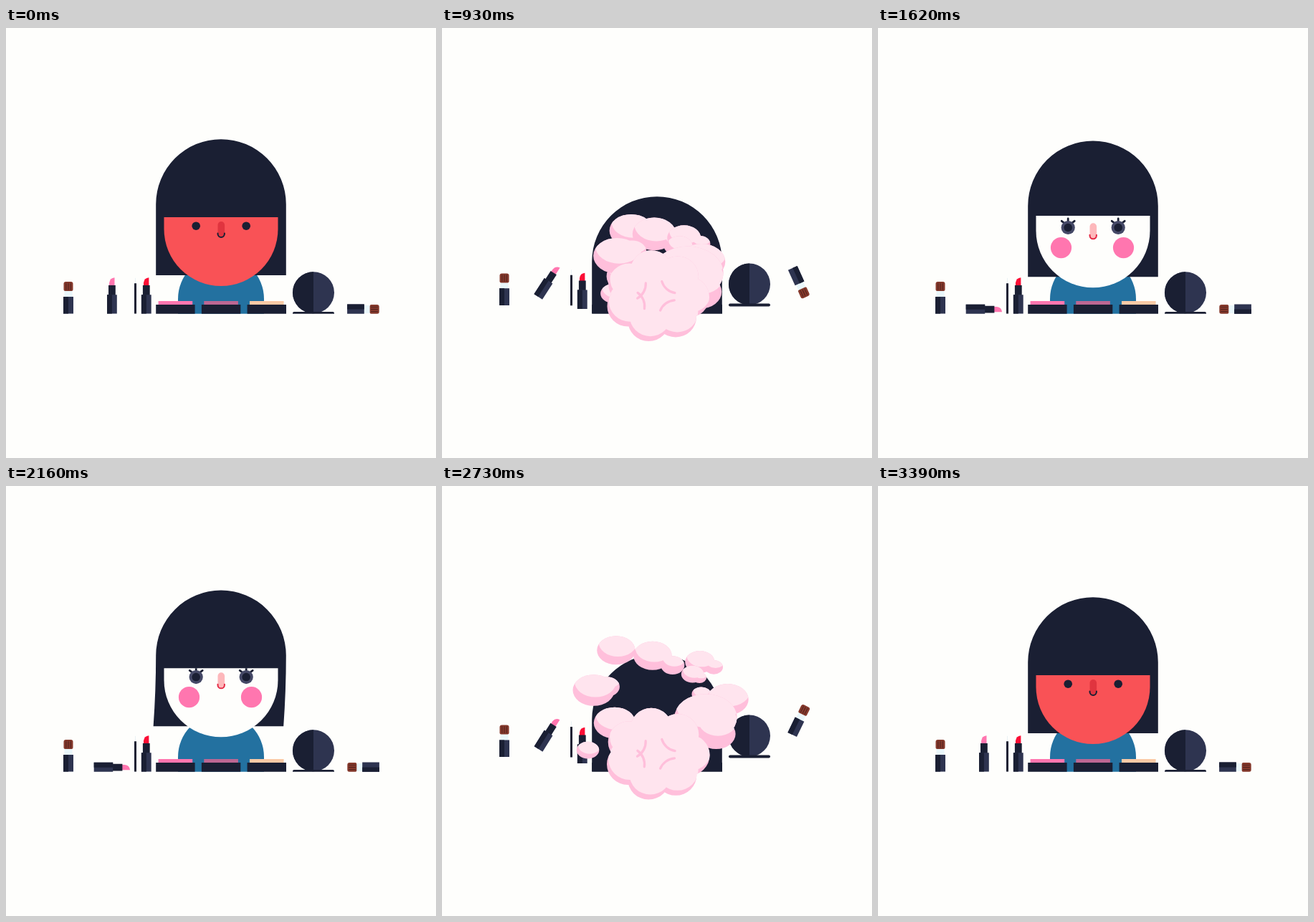
Animation of 600 by 600 pixels, one loop 3.42 s. Source, as an HTML page with a canvas:

```html
<!DOCTYPE html>
<html lang="en">
<head>
<meta charset="utf-8">
<title>Make-up</title>
<style>
html, body { margin: 0; width: 100%; height: 100%; overflow: hidden; background: #fefefc; }
canvas { display: block; width: 600px; height: 600px; }
</style>
</head>
<body>
<canvas id="stage" width="600" height="600"></canvas>
<script>
const ctx = document.getElementById('stage').getContext('2d');
const LOOP = 3420, BEAT = 1740, GROUND = 398.7, TAU = Math.PI * 2;
const PAPER = '#fefefc', DARK = '#1a1f33', SLATE = '#2e3450', PINK = '#ff76af';
const PUFF = '#ffbfdb', PUFF_LIGHT = '#ffe4ee';

// Progress from a to b, with easing
const clamp = x => Math.min(1, Math.max(0, x));
const span = (t, a, b) => clamp((t - a) / (b - a));
const sine = (t, a, b) => (1 - Math.cos(Math.PI * span(t, a, b))) / 2;
const out = (t, a, b) => 1 - (1 - span(t, a, b)) ** 2;
const quartic = (t, a, b) => {
  const x = span(t, a, b);
  return x < .5 ? 8 * x ** 4 : 1 - 8 * (1 - x) ** 4;
};
const mix = (a, b, k) => a + (b - a) * k;

// Drawing helpers
function fill(color) { ctx.fillStyle = color; ctx.fill(); }
function box(x, y, w, h, color, r = 0) {
  ctx.beginPath();
  ctx.roundRect(x, y, w, h, r);
  fill(color);
}
function disc(x, y, r, color, from = 0, to = TAU) {
  ctx.beginPath();
  ctx.arc(x, y, r, from, to);
  fill(color);
}
function stroke(color, width) {
  ctx.strokeStyle = color;
  ctx.lineWidth = width;
  ctx.lineCap = 'round';
  ctx.stroke();
}
function line(x1, y1, x2, y2, color, width) {
  ctx.beginPath();
  ctx.moveTo(x1, y1);
  ctx.lineTo(x2, y2);
  stroke(color, width);
}
function at(x, y, draw, turn = 0, size = 1) {
  ctx.save();
  ctx.translate(x, y);
  ctx.rotate(turn);
  ctx.scale(size, size);
  draw();
  ctx.restore();
}

// Table items
function brush() {
  box(-5.5, -10, 11, 9, '#e9f6fa');
  box(-6.5, -22.2, 13, 13, '#85392c', [3, 3, 2, 2]);
  for (const x of [-3.2, 0, 3.2]) line(x, -20, x, -11, '#4f211d', 1);
  box(-7, -1.3, 14, 23.7, SLATE);
  box(-7, -1.3, 7, 23.7, DARK);
}
function lipstick(color) {
  ctx.beginPath();
  ctx.moveTo(-3.8, -14);
  ctx.lineTo(-3.8, -18);
  ctx.quadraticCurveTo(-3, -24.7, 3.6, -25.2);
  ctx.lineTo(3.6, -14);
  fill(color);
  box(-4.9, -14.5, 9.8, 14, DARK);
  box(-6.9, -1.3, 13.8, 26.5, SLATE);
  box(-6.9, -1.3, 6.9, 26.5, DARK);
}
function liner() {
  box(-.5, -50, 1, 8, '#eaf1f3');
  box(-1.5, -42.5, 3, 42.5, DARK);
}
function compact() {
  disc(0, -29.5, 29, SLATE);
  disc(0, -29.5, 29, DARK, TAU / 4, TAU * .75);
  line(-27, -.6, 27, -.6, DARK, 4);
}

function items(l, second) {
  const up = out(l, 870, 1170);
  const lift = up - span(l, 1170, 1470) ** 2;
  const lying = second ? 1 - up : up;
  const rest = (l < 1170) === second ? 392.7 : 373.5;

  at(87, 376.3 - 32 * lift, brush);
  at(147.9, mix(rest, 319.6, lift), () => lipstick(PINK), lying * TAU / 4);
  at(180.5, GROUND - 31.5 * lift, liner);
  at(195.8, 373.5 - 18 * lift, () => lipstick('#fb0e35'));
  at(429, GROUND - 32 * lift, compact);
  at(498.5, 392.5 - 102 * lift, brush, TAU / 4 + (second + up) * TAU / 2);
}

function bodyAndPalettes() {
  box(240, 318, 120, 81, '#2371a0', [60, 60, 0, 0]);
  [PINK, '#bd6793', '#fbcaa6'].forEach((color, i) => {
    const x = 209.2 + i * 63.7;
    box(x + 3.4, 381, 47.6, 6, color);
    box(x, 386, 54.4, 13, DARK);
  });
}

function features(y, made) {
  for (const side of [-1, 1]) {
    const x = 300.2 + side * 35, ey = y + 121.2;
    if (made) {
      for (const k of [-1, 0, 1]) {
        const flat = Math.abs(k);
        line(x + k * 6, ey - 7, x + k * 9, ey - 12.6 + 3.4 * flat, DARK, 2.8);
      }
      disc(x, ey, 9.6, '#454967');
      disc(299 + side * 43.5, y + 149.3, 14.6, PINK);
    }
    disc(x, ey, 5.8, DARK);
  }
  box(295.5, y + 115, 9.6, 21, made ? '#fdb8bb' : '#e0343f', 4.8);
  ctx.beginPath();
  ctx.moveTo(295.5, y + 131.5);
  ctx.arc(300.2, y + 132.3, 4.7, Math.PI, 0, true);
  ctx.lineTo(304.9, y + 131.5);
  stroke(made ? '#e52843' : DARK, 2);
}

// Lift, slam, spring back past the rest pose, dip and settle
function head(l, second) {
  const rise = second ? 1085 : 1200, r = l - rise;
  const drop = span(l, 480, 846) ** 3;
  const y = 155 - 10 * sine(l, 0, 480) + 90 * drop - 98 * quartic(r, 0, 270)
    + 25.5 * sine(r, 270, 485) - 7.5 * sine(r, 485, 540);
  const bow = drop - sine(r, 90, 240);
  const veil = drop - 1.3 * sine(r, 90, 300) + .3 * sine(r, 300, 540);
  const sway = -3.8 * Math.sin(TAU * span(l, 60, 760) ** 1.8);

  const bottom = y + 190 - 27 * bow;
  const chin = y + 205 - 45 * bow;
  const brow = y + 109 + 30 * veil + 30 * veil ** 4;
  const made = second === l < 1000;

  ctx.beginPath();
  ctx.arc(300, y + 91, 90.8, Math.PI, 0);
  ctx.quadraticCurveTo(390.8, y + 140, 390.8 + sway, bottom);
  ctx.lineTo(209.2 + sway, bottom);
  ctx.quadraticCurveTo(209.2, y + 140, 209.2, y + 91);
  fill(DARK);

  ctx.save();
  ctx.beginPath();
  ctx.rect(200, brow, 200, 300);
  ctx.clip();
  box(220.5, chin - 170, 159, 170, made ? PAPER : '#f95256', [0, 0, 79.5, 79.5]);
  features(y, made);
  ctx.restore();
}

// Powder: soft lumps of overlapping lobes, lit from above
function lobes(list) {
  const path = new Path2D();
  for (const [x, y, rx, ry] of list) {
    path.moveTo(x + rx, y);
    path.ellipse(x, y, rx, ry, 0, 0, TAU);
  }
  return path;
}
function lump(path, dx, dy) {
  ctx.save();
  ctx.fillStyle = PUFF;
  ctx.fill(path);
  ctx.clip(path);
  ctx.translate(dx, dy);
  ctx.fillStyle = PUFF_LIGHT;
  ctx.fill(path);
  ctx.restore();
}

// Each piece: centre, radius and the offset of its smaller lobe
const pieces = [
  [216, 161, 22, 0, 0], [291, 172, 22, 23, 11], [388, 185, 17, 16, 6],
  [373, 210, 13, 8, 4], [391, 251, 11, 0, 0], [445, 262, 24, -14, 15],
  [400, 299, 36, 12, 19], [213, 310, 24, 0, 0], [158, 366, 13, 0, 2],
  [170, 243, 24, 15, -4]
].map(([x, y, r, dx, dy]) => ({
  x, y, r,
  path: lobes([[0, 0, r, r * .75], [dx, dy, r * .62, r * .48]])
}));

const ring = Array.from({ length: 7 }, (_, i) => {
  const a = -2.65 + i * TAU / 7;
  return { a, x: 38 * Math.cos(a), y: 31 * Math.sin(a) };
});
const cloud = lobes([[0, 0, 46, 40], ...ring.map(({ x, y }) => [x, y, 25, 24.5])]);

function burst() {
  lump(cloud, 2, -6);
  ring.forEach(({ a, x, y }, i) => {
    if (i % 2) return;
    ctx.beginPath();
    ctx.arc(x, y, 20, a + 2.6, a + 3.7);
    stroke(PUFF, 2.8);
  });
}

function powder(l) {
  const cx = 300, cy = 374;
  if (l >= 870 && l < 1400) {
    const go = out(l, 870, 1170), fade = span(l, 1170, 1400);
    const reach = mix(.1, 1, go) + .05 * fade;
    const size = mix(1.6, 1, go) * (1 - fade ** 2);
    for (const { x, y, r, path } of pieces) {
      at(mix(cx, x, reach), mix(cy, y, reach), () => lump(path, 2, -r * .42), 0, size);
    }
  }
  const size = (out(l, 760, 840) + .17 * out(l, 840, 960)) * (1 - span(l, 960, 1110) ** 4);
  if (size > 0) at(cx, cy, burst, 0, size);
}

function draw(t) {
  const second = t >= BEAT, l = t % BEAT;
  ctx.fillStyle = PAPER;
  ctx.fillRect(0, 0, 600, 600);
  ctx.save();
  ctx.beginPath();
  ctx.rect(0, 0, 600, GROUND);
  ctx.clip();
  bodyAndPalettes();
  items(l, second);
  head(l, second);
  ctx.restore();
  powder(l);
}

const start = performance.now();
function tick() {
  draw((performance.now() - start) % LOOP);
  requestAnimationFrame(tick);
}
tick();
</script>
</body>
</html>
```
